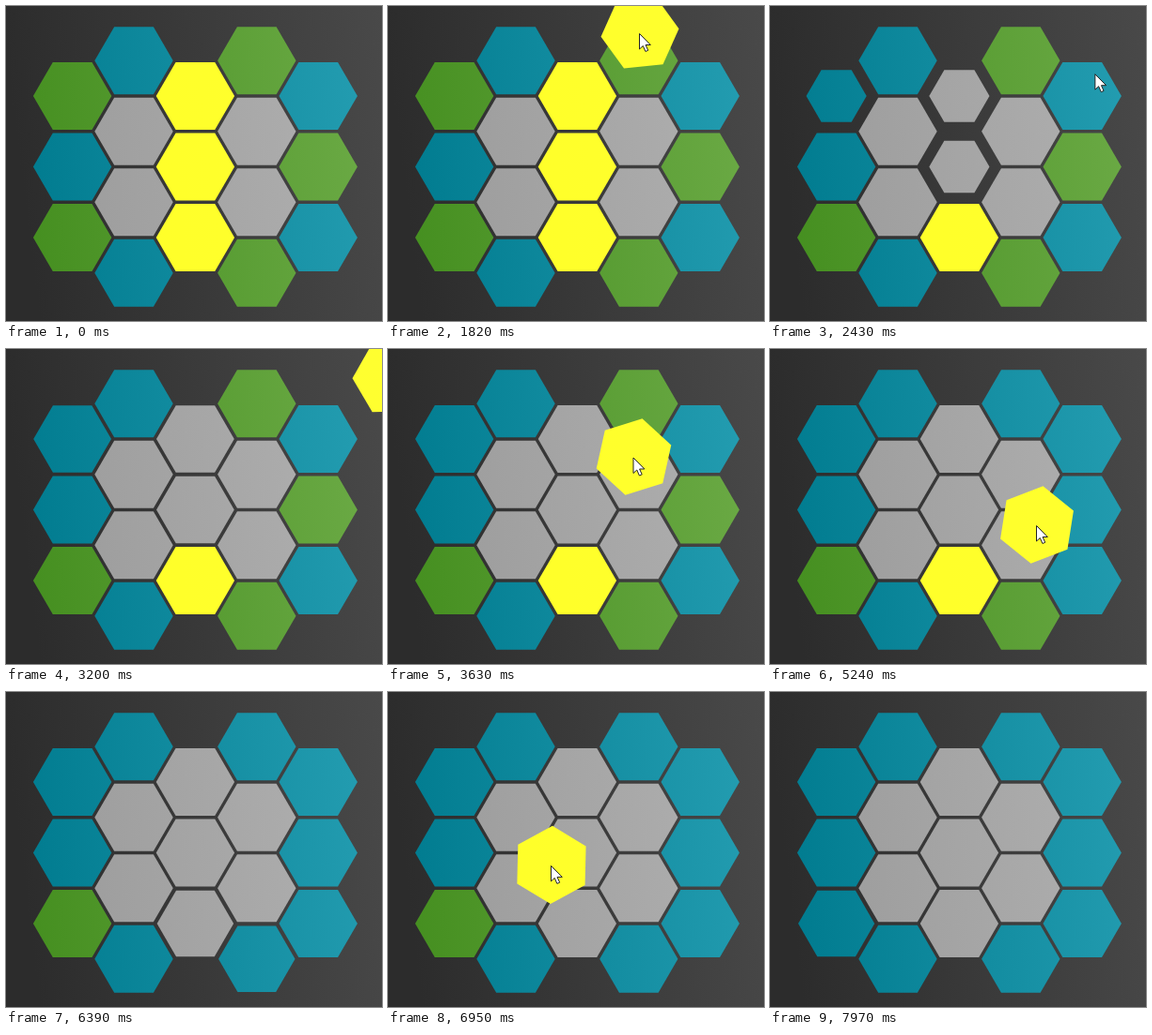
Recreate the animation shown at these times as an HTML page with a canvas. Size 400 by 336 pixels, loop 8000 ms.

```html
<!DOCTYPE html>
<html lang="en">
<head>
<meta charset="utf-8">
<title>Hexagon puzzle</title>
<style>
html, body { margin: 0; width: 100%; height: 100%; overflow: hidden; background: #393939; }
canvas { display: block; }
</style>
</head>
<body>
<canvas id="stage" width="400" height="336"></canvas>
<script>
const ctx = document.getElementById('stage').getContext('2d');
const LOOP = 8000, PITCH = 75.5, RADIUS = 41.7, SHRINK = 100, GROW = 225;

// Every colour gets lighter from left to right across the stage.
function shade(from, to) {
  const g = ctx.createLinearGradient(0, 50, 400, 0);
  g.addColorStop(0, from);
  g.addColorStop(1, to);
  return g;
}
const paint = {
  back: shade('#2c2c2c', '#494949'),
  b: shade('#007b8f', '#269fb3'),
  g: shade('#458f20', '#6eac48'),
  x: shade('#9a9a9a', '#b2b2b2'),
  y: shade('#ffff26', '#ffff30')
};
const solved = { g: 'b', y: 'x' };
const columns = ['gbg', 'bxxb', 'yyy', 'gxxg', 'bgb'];

const place = (c, r) => ({
  x: 201.4 + (c - 2) * PITCH * Math.sqrt(3) / 2,
  y: 171.5 + (r - (columns[c].length - 1) / 2) * PITCH
});

// A piece enters at one point, passes a second and lands on a slot.
function trip(enter, pass, drop, c, r) {
  const slot = place(c, r);
  return { ...slot, drop, path: [enter, pass, { t: drop, ...slot }] };
}
const trips = [
  trip({ t: 1640, x: 335, y: -60 }, { t: 1820, x: 268, y: 28.5 }, 2000, 1, 1),
  trip({ t: 3150, x: 445, y: 20 }, { t: 3630, x: 261.5, y: 115 }, 3740, 3, 1),
  trip({ t: 4820, x: 445, y: 120 }, { t: 5240, x: 284, y: 187.5 }, 5440, 3, 2),
  trip({ t: 6500, x: 445, y: 140 }, { t: 6850, x: 220, y: 165 }, 7050, 1, 2)
];

// A loose cell is solved when a piece lands on a neighbouring slot.
const cells = columns.flatMap((column, c) => [...column].map((kind, r) => {
  const { x, y } = place(c, r);
  const hit = solved[kind] && trips.find(p => Math.hypot(p.x - x, p.y - y) < PITCH * 1.1);
  return { x, y, kind, drop: hit ? hit.drop : Infinity };
}));

function hexagon(x, y, radius, color, angle = 0) {
  ctx.beginPath();
  for (let i = 0; i < 6; i++) {
    const a = angle + i * Math.PI / 3;
    ctx.lineTo(x + radius * Math.cos(a), y + radius * Math.sin(a));
  }
  ctx.fillStyle = paint[color];
  ctx.fill();
}

function drawCell({ x, y, kind, drop }, t) {
  const age = t - drop;
  if (age < 0) hexagon(x, y, RADIUS, kind);
  else if (age < SHRINK) hexagon(x, y, RADIUS * (1 - age / SHRINK), kind);
  else hexagon(x, y, RADIUS * (1 - Math.exp((SHRINK - age) / GROW)), solved[kind]);
}

// Parabola in time through three points.
function along([p, q, s], t, axis) {
  const first = (q[axis] - p[axis]) / (q.t - p.t);
  const second = (s[axis] - q[axis]) / (s.t - q.t);
  return p[axis] + (t - p.t) * (first + (t - q.t) * (second - first) / (s.t - p.t));
}

const arrow = new Path2D('M0 0V16.5L3.8 13L6.4 19L9.2 17.8L6.6 12H11.8Z');
function pointer(x, y) {
  ctx.save();
  ctx.translate(x, y);
  ctx.fillStyle = '#fff';
  ctx.strokeStyle = '#222';
  ctx.fill(arrow);
  ctx.stroke(arrow);
  ctx.restore();
}

function drawTrip({ path, drop, x, y }, t) {
  const age = t - drop, angle = (-6 - 0.0395 * (t - 1820)) * Math.PI / 180;
  if (t < path[0].t) return;
  if (age < 0) {
    const px = along(path, t, 'x'), py = along(path, t, 'y');
    hexagon(px, py, RADIUS, 'y', angle);
    pointer(px - 0.5, py + 1);
  } else {
    if (age < SHRINK) hexagon(x, y, RADIUS * (1 - age / SHRINK), 'y', angle);
    pointer(x + 0.488 * age, y - 0.142 * age);
  }
}

function draw(t) {
  ctx.fillStyle = paint.back;
  ctx.fillRect(0, 0, 400, 336);
  for (const cell of cells) drawCell(cell, t);
  for (const one of trips) drawTrip(one, t);
}

let start;
function frame(now) {
  start ??= now;
  draw((now - start) % LOOP);
  requestAnimationFrame(frame);
}
draw(0);
requestAnimationFrame(frame);
</script>
</body>
</html>
```
